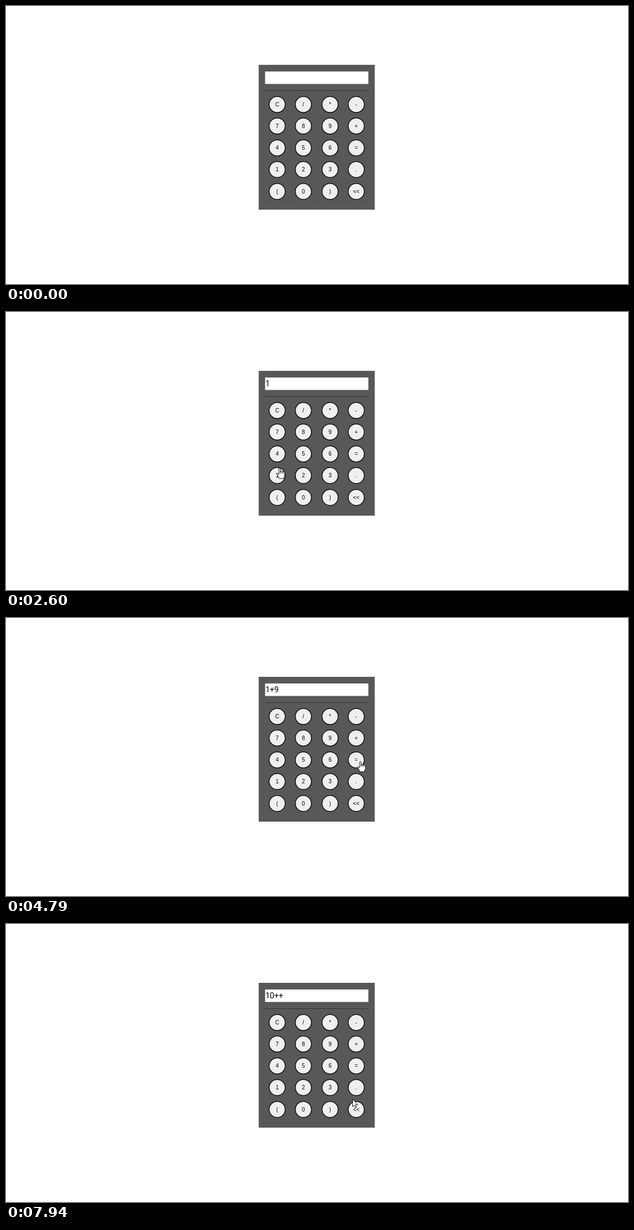
An HTML page without scripts that plays this animation: 1117x501 px, repeating every 8000 ms.

```html
<!DOCTYPE html>
<html lang="en">
<head>
<meta charset="utf-8">
<title>Calculator</title>
<style>
  html, body { margin: 0; width: 100%; height: 100%; overflow: hidden; background: #fff; }
  svg { display: block; }
  text { font-family: "Liberation Sans", Arial, sans-serif; fill: #000; }
  .keys use { fill: #efefef; stroke: #000; stroke-width: 1.3; }
  .keys text { font-size: 10px; text-anchor: middle; }
  .lines { font: 14px Roboto, sans-serif; animation: type 8s step-end infinite; }
  .pointer { animation: move 8s step-end infinite; }
  .pointer path { fill: #fff; stroke: #000; stroke-width: .9; stroke-linejoin: round; }
  .arrow { opacity: 0; animation: arrow 8s step-end infinite; }
  .hand { opacity: 0; animation: hand 8s step-end infinite; }
  .press { opacity: 0; fill: #ff0; animation: press 8s step-end infinite; }

  /* Each line of the display is 22px tall */
  @keyframes type {
    0% { transform: translateY(0); }
    31.625% { transform: translateY(-22px); }
    40.25% { transform: translateY(-44px); }
    49.5% { transform: translateY(-66px); }
    65.75% { transform: translateY(-88px); }
    86.625% { transform: translateY(-110px); }
    89.875%, 100% { transform: translateY(-132px); }
  }

  @keyframes move {
    0%, 5.75% { transform: translate(804px, 483px); }
    7% { transform: translate(779px, 476px); }
    /* to 1 */
    14.125% { transform: translate(771px, 471px); animation-timing-function: steps(2); }
    15.875% { transform: translate(720px, 440px); animation-timing-function: steps(3); }
    18.5% { transform: translate(620px, 378px); animation-timing-function: steps(3); }
    21.125% { transform: translate(549px, 335px); animation-timing-function: steps(3); }
    23.75% { transform: translate(506px, 308px); }
    24.625% { transform: translate(496px, 299px); animation-timing-function: steps(2); }
    26.375% { transform: translate(482px, 285px); }
    /* to + */
    32.5% { transform: translate(491px, 281px); animation-timing-function: steps(4); }
    35.875% { transform: translate(603px, 233px); }
    36.75% { transform: translate(620px, 226px); }
    37.5% { transform: translate(628px, 222px); }
    /* to 9 */
    41.125% { transform: translate(625px, 222px); animation-timing-function: steps(4); }
    44.625% { transform: translate(592px, 221px); }
    45.5% { transform: translate(586px, 221px); }
    46.375% { transform: translate(583px, 221px); }
    /* to = */
    51.25% { transform: translate(602px, 226px); }
    52% { transform: translate(613px, 232px); animation-timing-function: steps(3); }
    54.625% { transform: translate(631px, 250px); animation-timing-function: steps(3); }
    57.25% { transform: translate(636px, 258px); }
    59% { transform: translate(636px, 259px); }
    59.875% { transform: translate(636px, 258px); }
    /* back to + */
    74.875% { transform: translate(633px, 250px); }
    75.75% { transform: translate(628px, 236px); }
    76.5% { transform: translate(624px, 218px); }
    77.375% { transform: translate(622px, 208px); }
    79.875% { transform: translate(622px, 210px); }
    81.5% { transform: translate(621px, 213px); }
    82.375% { transform: translate(621px, 212px); }
    /* down to << */
    96.625% { transform: translate(617px, 223px); }
    97.5% { transform: translate(617px, 252px); }
    98.375% { transform: translate(619px, 290px); }
    99.25%, 100% { transform: translate(622px, 315px); }
  }

  /* The hand shows over a key, the arrow elsewhere */
  @keyframes hand {
    0%, 22.875%, 33.344%, 35.875%, 42.875%, 51.25%, 75.75%, 99.25%, 100% { opacity: 0; }
    22%, 24.625%, 34.188%, 36.75%, 44.625%, 53.75%, 76.5% { opacity: 1; }
  }
  @keyframes arrow {
    0%, 22%, 24.625%, 34.188%, 36.75%, 44.625%, 53.75%, 76.5% { opacity: 0; }
    5.75%, 22.875%, 33.344%, 35.875%, 42.875%, 51.25%, 75.75%, 99.25%, 100% { opacity: 1; }
  }
  @keyframes press {
    0%, 29.875%, 40.25%, 49.5%, 65.75%, 86.625%, 89.875%, 100% { opacity: 0; }
    28.875%, 39.375%, 48.625%, 64.875%, 85.75%, 89% { opacity: .65; }
  }
</style>
</head>
<body>
<svg width="1117" height="501">
  <defs>
    <g id="row">
      <circle cx="487" r="14.4"/>
      <circle cx="534" r="14.4"/>
      <circle cx="582" r="14.4"/>
      <circle cx="629" r="14.4"/>
    </g>
  </defs>

  <rect x="453.8" y="106" width="208.4" height="261" fill="#585858"/>
  <rect x="465.3" y="118" width="185.4" height="22.5" fill="#fff"/>
  <path d="M465.5 152.5H650.5" stroke="#333"/>

  <svg x="466" y="118" width="184" height="22">
    <text class="lines">
      <tspan x="0" y="37.5">1</tspan>
      <tspan x="0" y="59.5">1+</tspan>
      <tspan x="0" y="81.5">1+9</tspan>
      <tspan x="0" y="103.5">10</tspan>
      <tspan x="0" y="125.5">10+</tspan>
      <tspan x="0" y="147.5">10++</tspan>
    </text>
  </svg>

  <g class="keys">
    <use href="#row" y="177.5"/>
    <use href="#row" y="216.3"/>
    <use href="#row" y="255.8"/>
    <use href="#row" y="294.7"/>
    <use href="#row" y="334.2"/>
    <text x="487 534 582 629" y="181">C/*-</text>
    <text x="487 534 582 629" y="220">789+</text>
    <text x="487 534 582 629" y="259">456=</text>
    <text x="487 534 582 629" y="298">123.</text>
    <text x="487 534 582" y="338">(0)</text>
    <text x="629" y="338">&lt;&lt;</text>
  </g>

  <g class="pointer">
    <path class="arrow" d="M.5 .8V14.2L3.5 11.4 5.5 16 7.5 15.1 5.6 10.6H9.7Z"/>
    <path class="hand" d="M-1 12V1.8a1.3 1.3 0 0 1 2.6 0V7a1.3 1.3 0 0 1 2.7 .4a1.3 1.3 0 0 1 2.6 .5a1.3 1.3 0 0 1 2.6 .8V13q0 2-1.6 4V19H-.7V17.6Q-2.2 15.5-4 12q-1-2 .3-2.3q1.3 0 2.7 2.3M1.6 6.5V10M4.3 7.4V10M6.9 8V10.4"/>
    <circle class="press" r="10"/>
  </g>
</svg>
</body>
</html>
```
